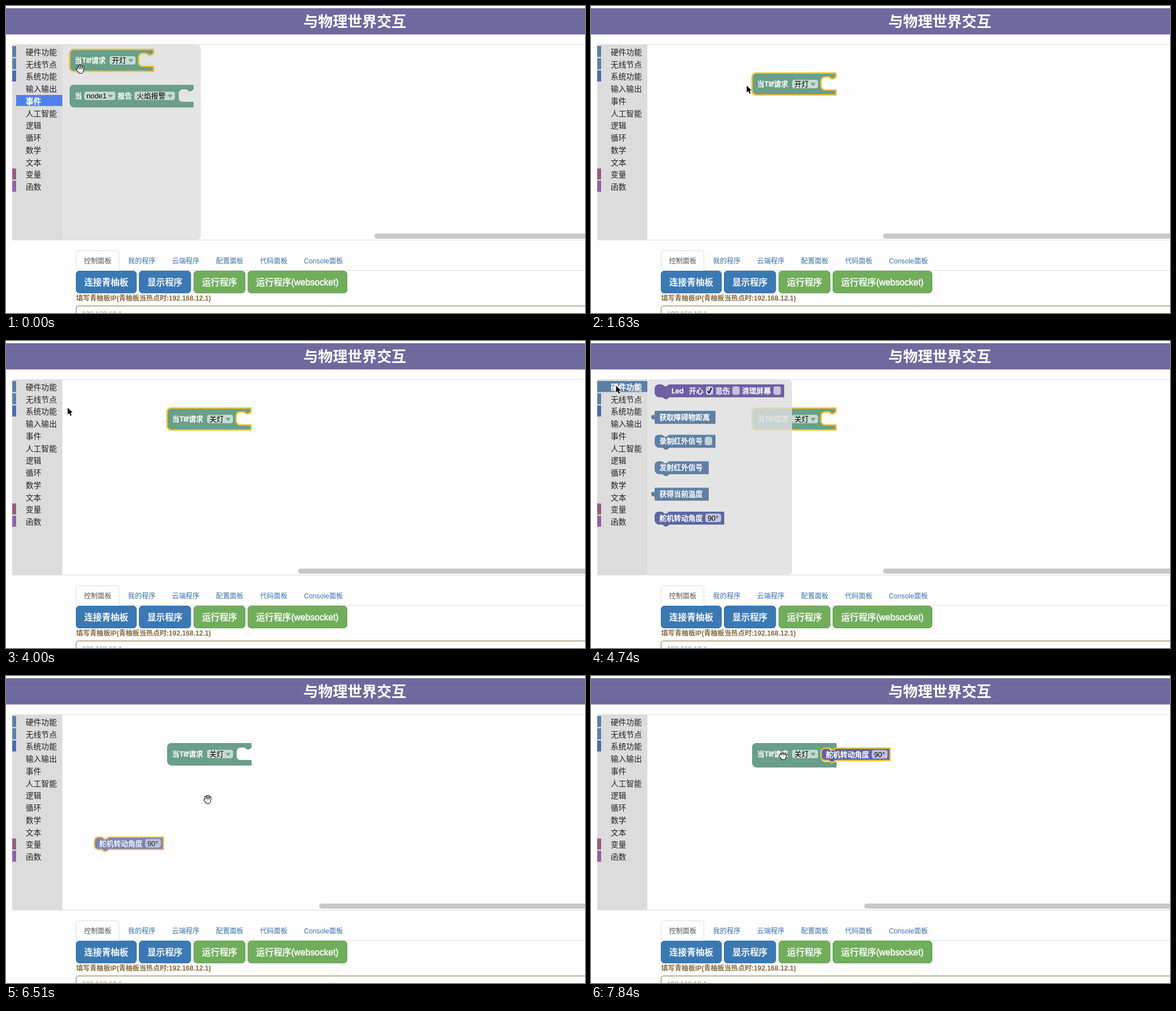
An HTML page with a canvas that plays this animation: 1028 px wide and 545 px high, repeating every 7.99 s.

```html
<!DOCTYPE html>
<html lang="zh">
<head>
<meta charset="utf-8">
<style>
html, body { margin: 0; width: 100%; height: 100%; overflow: hidden; background: #fff; }
canvas { display: block; }
</style>
</head>
<body>
<canvas id="stage" width="1028" height="545"></canvas>
<script>
const ctx = document.getElementById('stage').getContext('2d');
const LOOP = 7990, STEP = 148;
const FONT = '"Liberation Sans", "Noto Sans CJK SC", "Noto Sans CJK", sans-serif';
const GREEN = '#6a9f8a', BLUE = '#5f81a6', INDIGO = '#5b67a5', PURPLE = '#6d60a3', YELLOW = '#f6c233';

const categories = [
  ['硬件功能', '#5b80a5'], ['无线节点', '#5b80a5'], ['系统功能', '#4b6ca8'], ['输入输出'], ['事件'],
  ['人工智能'], ['逻辑'], ['循环'], ['数学'], ['文本'], ['变量', '#995b80'], ['函数', '#8f62a5']
];

// parts: [text, offset, field width, field type]
const request = { kind: 'hat', w: 149, h: 39, color: GREEN, parts: [['当Tilf请求', 9], ['开灯', 71, 46, 'menu']] };
const report = { kind: 'hat', w: 219, h: 39, color: GREEN,
  parts: [['当', 9], ['node1', 26, 55, 'menu'], ['报告', 85], ['火焰报警', 115, 72, 'menu']] };
const servo = { kind: 'stack', w: 122.5, h: 22, color: INDIGO, parts: [['舵机转动角度', 8.5], ['90°', 90, 28, 'input']] };
const led = { kind: 'stack', w: 229, h: 22, color: PURPLE,
  parts: [['Led', 30], ['开心', 61], ['on', 91, 13, 'check'], ['悲伤', 108], ['', 138, 13, 'check'],
    ['清理屏幕', 155], ['', 211, 13, 'check']] };
const simple = (kind, label, w, extra = []) =>
  ({ kind, w, h: 22, color: BLUE, parts: [[label, 8.5], ...extra] });

const eventFlyout = { row: 4, right: 346, items: [[request, 77], [report, 140]] };
const hardwareFlyout = { row: 0, right: 357, items: [
  [led, 77], [simple('value', '获取障碍物距离', 107), 124],
  [simple('stack', '录制红外信号', 107, [['', 89, 13, 'check']]), 166.5],
  [simple('stack', '发射红外信号', 95), 213.5], [simple('value', '获得当前温度', 95), 260.5], [servo, 303]
] };

// [step, x, y]
const cursorPath = [
  [0, 132, 112], [1, 149, 103], [2, 149, 103], [3, 262, 131], [4, 312, 142], [5, 322, 144], [7, 322, 144],
  [9, 316, 145], [10, 300, 144], [11, 276, 141], [12, 330, 139], [13, 392, 135], [15, 393, 137],
  [17, 388, 165], [19, 378, 180], [23, 378, 180], [24, 250, 152], [25, 147, 129], [26, 147, 129],
  [27, 109, 118], [28, 80, 100], [30, 40, 77], [31, 40, 77], [32, 44, 79], [34, 85, 84], [38, 169, 100],
  [39, 165, 176], [40, 162, 219], [41, 155, 306], [42, 146, 316], [43, 146, 316], [44, 358, 219],
  [45, 412, 170], [46, 434, 147], [48, 441, 142], [51, 441, 142], [52, 400, 141], [53, 341, 141]
];
const requestPath = [[3, 147, 85], [4, 245, 108], [5, 286, 119]];
const servoPath = [[44, 157, 286], [45, 280, 235], [46, 372, 170], [47, 402, 138], [48, 408.5, 128]];

function along(path, step) {
  const i = path.findIndex(k => k[0] > step);
  if (i < 0) return path[path.length - 1].slice(1);
  if (i === 0) return path[0].slice(1);
  const a = path[i - 1], b = path[i], p = (step - a[0]) / (b[0] - a[0]);
  return [a[1] + (b[1] - a[1]) * p, a[2] + (b[2] - a[2]) * p];
}

function rect(x, y, w, h, color) {
  ctx.fillStyle = color;
  ctx.fillRect(x, y, w, h);
}

function round(x, y, w, h, r, fill, stroke) {
  ctx.beginPath();
  ctx.roundRect(x, y, w, h, r);
  if (fill) { ctx.fillStyle = fill; ctx.fill(); }
  if (stroke) { ctx.strokeStyle = stroke; ctx.lineWidth = 1; ctx.stroke(); }
}

// cy is the visual middle of the line; thick adds a thin outline
function text(s, x, cy, size, color, { weight = 400, thick = 0 } = {}) {
  ctx.font = `${weight} ${size}px ${FONT}`;
  ctx.fillStyle = color;
  const y = cy + size * 0.37;
  ctx.fillText(s, x, y);
  if (thick) {
    ctx.strokeStyle = color;
    ctx.lineWidth = thick;
    ctx.lineJoin = 'round';
    ctx.strokeText(s, x, y);
  }
}

function blockPath(b, h) {
  const p = new Path2D(), w = b.w, r = 7;
  const line = (...pts) => pts.forEach(q => p.lineTo(q[0], q[1]));
  const notch = (x, y) => line([x, y], [x - 5, y + 3.5], [x - 7.6, y + 3.5], [x - 12.6, y]);
  if (b.kind === 'value') {
    p.moveTo(0, 0);
    line([w, 0], [w, h], [0, h], [0, 17]);
    p.bezierCurveTo(0, 10, -6, 18, -6, 11);
    p.bezierCurveTo(-6, 4, 0, 11, 0, 5);
    p.closePath();
    return p;
  }
  p.moveTo(r, 0);
  if (b.kind === 'hat') {
    const cx = w - 26.5, bottom = h - 9;
    line([w, 0], [w, 7]);
    notch(w, 7);
    p.arcTo(cx, 7, cx, 14, r);
    p.arcTo(cx, bottom, cx + r, bottom, r);
    line([w, bottom], [w, h]);
  } else {
    line([13, 0], [18, 3.5], [20.6, 3.5], [25.6, 0], [w, 0], [w, h]);
    notch(25.6, h);
  }
  p.arcTo(0, h, 0, h - r, r);
  p.arcTo(0, 0, r, 0, r);
  p.closePath();
  return p;
}

function drawField(label, x, cy, w, type, color) {
  round(x, cy - 7.5, w, 15, 4, 'rgba(255,255,255,.62)');
  if (type !== 'check') text(label, x + 4, cy, 12.8, '#000');
  ctx.beginPath();
  if (type === 'menu') {
    ctx.moveTo(x + w - 13, cy - 2);
    ctx.lineTo(x + w - 4, cy - 2);
    ctx.lineTo(x + w - 8.5, cy + 3.5);
    ctx.fillStyle = color;
    ctx.fill();
  } else if (label === 'on') {
    ctx.moveTo(x + 3, cy + 1);
    ctx.lineTo(x + 5.5, cy + 4);
    ctx.lineTo(x + 10, cy - 4.5);
    ctx.strokeStyle = '#000';
    ctx.lineWidth = 1.8;
    ctx.stroke();
  }
}

function drawBlock(b, x, y, { selected = false, alpha = 1, h = b.h, option } = {}) {
  const path = blockPath(b, h), cy = b.kind === 'hat' ? 19.5 : 11;
  ctx.save();
  ctx.globalAlpha = alpha;
  ctx.translate(x, y);
  if (!selected) {
    ctx.save();
    ctx.translate(0.8, 0.8);
    ctx.fillStyle = b.color;
    ctx.fill(path);
    ctx.fillStyle = 'rgba(0,0,0,.25)';
    ctx.fill(path);
    ctx.restore();
  }
  ctx.fillStyle = b.color;
  ctx.fill(path);
  if (selected) {
    ctx.strokeStyle = YELLOW;
    ctx.lineWidth = 2.6;
    ctx.lineJoin = 'miter';
    ctx.stroke(path);
  }
  for (const [label, dx, w, type] of b.parts) {
    if (type) drawField(type === 'menu' && option ? option : label, dx, cy, w, type, b.color);
    else text(label, dx, cy, 12.8, '#fff', { thick: 0.55 });
  }
  ctx.restore();
}

function drawToolbox(row) {
  rect(11, 69, 89, 346, '#dcdcdc');
  categories.forEach(([name, color], i) => {
    const y = 71 + i * 21.75, active = i === row;
    if (active) rect(18, y, 82, 19.5, color || '#5080ea');
    if (color) rect(11, y, 7, 19.5, color);
    text(name, 35, y + 10.7, 13.8, active ? '#fff' : '#222', { thick: active ? 0.7 : 0 });
  });
}

function drawFlyout({ right, items }, [mx, my]) {
  round(100, 69, right - 100, 346, [0, 7, 7, 0], 'rgba(221,222,221,.82)');
  for (const [b, y] of items) {
    const hover = mx >= 112 && mx <= 113 + b.w && my >= y - 2 && my <= y + b.h + 2;
    drawBlock(b, 113, y, { selected: hover });
  }
}

function drawMenu([, my]) {
  ctx.save();
  ctx.shadowColor = 'rgba(0,0,0,.25)';
  ctx.shadowBlur = 3;
  ctx.shadowOffsetY = 1;
  rect(335, 148, 137, 133, '#fff');
  ctx.restore();
  ctx.strokeStyle = '#ccc';
  ctx.lineWidth = 1;
  ctx.strokeRect(335.5, 148.5, 136, 132);
  ['开灯', '关灯', '开门', '关门', '你好'].forEach((name, i) => {
    const y = 152 + i * 25;
    if (my >= y && my < y + 25) rect(336, y, 135, 25, '#d6e9f8');
    text(name, 361, y + 12.5, 12.8, '#000');
    if (i === 0) text('✓', 343, y + 12.5, 12.8, '#000');
  });
}

function drawArrow(x, y) {
  ctx.save();
  ctx.translate(x, y);
  ctx.beginPath();
  [[0.5, 0.5], [0.5, 12.5], [3.3, 10], [5.3, 14.8], [7.5, 13.9], [5.5, 9.2], [9.3, 9]]
    .forEach(p => ctx.lineTo(...p));
  ctx.closePath();
  ctx.lineJoin = 'round';
  ctx.strokeStyle = '#fff';
  ctx.lineWidth = 2;
  ctx.stroke();
  ctx.fillStyle = '#000';
  ctx.fill();
  ctx.restore();
}

function drawHand(x, y, closed) {
  const top = closed ? -3 : -5.5;
  ctx.save();
  ctx.translate(x, y);
  ctx.lineCap = ctx.lineJoin = 'round';
  const fingers = [[-4, top + 1.5], [-1.2, top], [1.8, top], [4.8, top + 1.8]];
  const palm = new Path2D('M-3.5 0 L4.5 0 L3.5 4 L2.5 6 L-1.5 6 L-5.5 1 Z');
  for (const [color, width] of [['#000', 3.8], ['#fff', 1.8]]) {
    ctx.strokeStyle = ctx.fillStyle = color;
    ctx.lineWidth = width;
    ctx.beginPath();
    fingers.forEach(([fx, fy], i) => {
      ctx.moveTo(fx, fy);
      ctx.lineTo(-2.5 + i * 2.2, 1);
    });
    ctx.stroke();
    ctx.stroke(palm);
    ctx.fill(palm);
  }
  ctx.strokeStyle = '#000';
  ctx.lineWidth = 0.8;
  ctx.beginPath();
  for (const fx of [-2.4, 0.3, 3]) {
    ctx.moveTo(fx, top + 1.5);
    ctx.lineTo(fx * 0.9, 0);
  }
  ctx.stroke();
  ctx.restore();
}

function drawPage() {
  rect(0, 0, 1028, 545, '#fefefe');
  rect(0, 4, 1028, 46.5, '#6f6a9e');
  text('与物理世界交互', 528, 27.5, 26.1, '#fff', { weight: 700 });
  rect(11, 68, 1017, 1, '#ddd');
  rect(11, 415, 1017, 1, '#ddd');

  rect(124, 469, 904, 1, '#ddd');
  round(124.5, 434.5, 76, 40, 4, '#fff', '#ddd');
  ['控制面板', '我的程序', '云端程序', '配置面板', '代码面板', 'Console面板'].forEach((name, i) =>
    text(name, 138.5 + i * 78.1, 452, 12.2, i ? '#3a70a8' : '#555'));
  rect(124, 470, 78, 10, '#fefefe');

  const blue = ['#3a79b4', '#3470a8'], green = ['#70ae5b', '#66a551'];
  [['连接青柚板', 124, 108, blue], ['显示程序', 236, 92.5, blue], ['运行程序', 333, 92, green],
    ['运行程序(websocket)', 429, 177, green]].forEach(([name, x, w, [fill, edge]]) => {
    round(x + 0.5, 470.5, w - 1, 39, 5.5, fill, edge);
    text(name, x + 15, 490, 15.6, '#fff', { thick: 0.5 });
  });
  text('填写青柚板IP(青柚板当热点时:192.168.12.1)', 124.5, 519, 12.1, '#866a3c', { weight: 700 });
  round(124.5, 532.5, 930, 30, 4, '#fff', '#8a6d3b');
  text('192.168.10.1', 135, 546, 12.2, '#999');
}

function drawScrollbar(step) {
  const x = step < 3 ? 654 : step < 7 ? 610 : step < 44 ? 518.5 : step < 51 ? 556 : 485;
  round(x, 404, 1100 - x, 9, 4.5, '#c8c8c8');
}

function drawCursor(step, [x, y]) {
  const overBlock = step < 11 || step === 12 || step >= 41;
  if (overBlock) drawHand(x, y, step === 1 || step === 2 || step === 42 || step === 43 || step === 53);
  else drawArrow(x, y);
}

function render(time) {
  const step = Math.min(53, Math.floor((time % LOOP + 8) / STEP));
  const cursor = along(cursorPath, step);
  const flyout = step < 3 ? eventFlyout : step >= 32 && step < 44 ? hardwareFlyout : null;
  drawPage();
  drawScrollbar(step);
  if (step >= 3) {
    drawBlock(request, ...along(requestPath, step), {
      selected: step < 44,
      alpha: step < 7 ? 0.8 : 1,
      h: step >= 51 ? 42.5 : 39,
      option: step >= 21 ? '关灯' : '开灯'
    });
  }
  if (step >= 44) drawBlock(servo, ...along(servoPath, step), { selected: true, alpha: step < 51 ? 0.8 : 1 });
  drawToolbox(flyout ? flyout.row : -1);
  if (flyout) drawFlyout(flyout, cursor);
  if (step >= 15 && step < 21) drawMenu(cursor);
  drawCursor(step, cursor);
}

function tick() {
  render(performance.now());
  requestAnimationFrame(tick);
}
tick();
</script>
</body>
</html>
```
